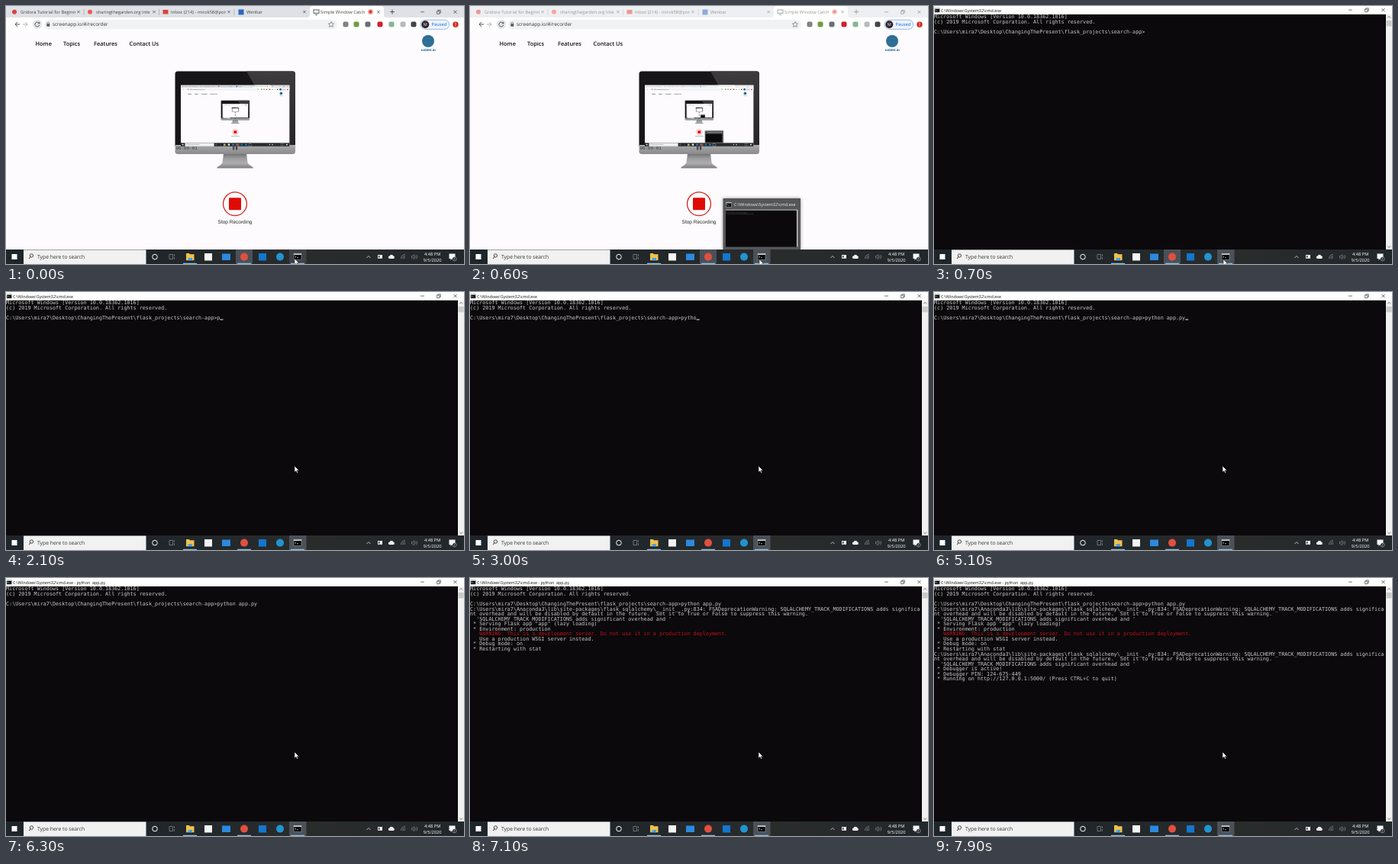
An HTML page that plays this animation: 600 by 338 pixels, repeating every 8 s.

```html
<!DOCTYPE html>
<html lang="en">
<head>
<meta charset="utf-8">
<title>Terminal demo</title>
<style>
html, body { margin: 0; width: 100%; height: 100%; overflow: hidden; background: #fff; }
svg { display: block; }
text { white-space: pre; text-rendering: geometricPrecision; font-family: "Open Sans", sans-serif; }
.mono text { font: 6.75px "DejaVu Sans Mono", monospace; fill: #ccc; }
.mono .warn { fill: #c50f1f; }
.shadow { filter: drop-shadow(0 0 2px rgba(0, 0, 0, .4)); }
</style>
</head>
<body>
<svg id="stage" width="600" height="338" viewBox="0 0 600 338"></svg>
<script>
const LOOP = 8000, COL = 4.064, ROW = 6.56;
const OPEN_AT = 700, ENTER_AT = 5800;

const rect = (x, y, w, h, fill, more = '') =>
  `<rect x="${x}" y="${y}" width="${w}" height="${h}" fill="${fill}" ${more}/>`;
const dot = (x, y, r, fill, more = '') =>
  `<circle cx="${x}" cy="${y}" r="${r}" fill="${fill}" ${more}/>`;
const line = (d, stroke, width = 0.8) =>
  `<path d="${d}" fill="none" stroke="${stroke}" stroke-width="${width}"/>`;
const text = (x, y, str, size, fill = '#222', more = '') =>
  `<text x="${x}" y="${y}" font-size="${size}" fill="${fill}" ${more}>${str}</text>`;
const cross = (x, y, r, stroke) =>
  line(`M${x - r} ${y - r}l${2 * r} ${2 * r}m0 ${-2 * r}l${-2 * r} ${2 * r}`, stroke, 0.7);
const windowButtons = y =>
  line(`M543 ${y}h5M564.5 ${y - 1}h3.5v3.5h-3.500zM565.800 ${y - 1}v-1.300h3.500v3.500h-1.300`, '#222', 0.6) +
  cross(588.5, y, 2, '#222');
const consoleIcon = (x, y, w, h) =>
  rect(x, y, w, h, '#050505', 'stroke="#b8bcc0" stroke-width=".5"') +
  rect(x, y, w, h * 0.2, '#d0d3d6') +
  line(`M${x + w * 0.15} ${y + h * 0.4}l${w * 0.15} ${h * 0.12}l${-w * 0.15} ${h * 0.12}m${w * 0.25} 0h${w * 0.2}`, '#eee', 0.6);

function tab(x, icon, title, width = 72) {
  return icon +
    `<svg x="${x + 17}" y="0" width="${width}" height="15">${text(0, 10, title, 5.8, '#444')}</svg>` +
    cross(x + 93, 7.7, 1.7, '#444');
}

function browserTop() {
  const seps = [102, 200.5, 299].map(x => line(`M${x} 4v8`, '#9a9da1', 0.6)).join('');
  const extras = [[445, '#7d8286'], [459, '#6f9c45'], [474, '#6a6e72'], [490, '#cf222b'],
    [505, '#86b596'], [520, '#b7babd'], [534, '#41454a']]
    .map(([x, c]) => rect(x - 3.5, 20.5, 7, 7, c, 'rx="2"')).join('');
  return rect(0, 0, 600, 15, '#dfe1e6') +
    '<path d="M394 15q4 0 4-4V4q0-4 4-4h89q4 0 4 4v7q0 4 4 4z" fill="#fff"/>' +
    tab(2, dot(11, 7.7, 3, '#d8443c'), 'Gridora Tutorial for Beginners') +
    tab(101, dot(110, 7.7, 3, '#ee5a55'), 'sharingthegarden.org Inte') +
    tab(199, rect(205.5, 5, 7, 5.5, '#d9453b'), 'Inbox (214) - mirok58@pomail') +
    tab(298, rect(304.5, 4.5, 7, 7, '#2d68c4'), 'Wenbar') +
    tab(395, rect(403, 5, 7, 4.5, 'none', 'stroke="#333" stroke-width=".8"') +
      line('M405 11.5h3', '#333'), 'Simple Window Catcher', 58) +
    seps + dot(477.5, 7.7, 3, '#fff', 'stroke="#d93025" stroke-width=".6"') + dot(477.5, 7.7, 2.1, '#d93025') +
    line('M503 7.7h6M506 4.7v6', '#333') + windowButtons(7.8) +
    rect(0, 0, 600, 15, '#fff', 'class="preview" fill-opacity=".45"') +
    rect(0, 15, 600, 18, '#fff') + rect(50, 18, 384, 12.5, '#f0f2f4', 'rx="6.2"') +
    line('M18 24h-6m3-3l-3 3l3 3', '#444', 0.9) +
    line('M22 24h6m-3-3l3 3l-3 3', '#a5a8ab', 0.9) +
    dot(41, 24, 6.3, '#e6e8ea') +
    line('M43.500 22.500a3 3 0 1 0 .3 2.500M43.900 20.700v2.200h-2.200', '#444', 0.9) +
    rect(53.3, 23.3, 4, 3.4, '#555') + line('M54.1 23.5v-1a1.2 1.2 0 0 1 2.4 0v1', '#555', 0.7) +
    text(61, 26.4, 'screenapp.io/#/recorder', 6.4, '#333') +
    '<path d="M426 20.5l1.1 2.4 2.6.3-2 1.7.6 2.6-2.3-1.4-2.3 1.4.6-2.6-2-1.7 2.6-.3z" fill="none" stroke="#555" stroke-width=".6"/>' +
    extras + rect(543, 18.2, 37.7, 12.2, '#edf3fe', 'rx="6.1" stroke="#8db3ee" stroke-width=".9"') +
    dot(549.3, 24.3, 5, '#34252a') + text(549.3, 26.3, 'M', 5.5, '#fff', 'text-anchor="middle"') +
    text(557.5, 26.4, 'Paused', 5.8, '#1a66d0') +
    dot(589, 24.2, 3.7, '#d3281f') + [22.4, 24.2, 26].map(y => dot(589, y, 0.6, '#fff')).join('');
}

function taskbar() {
  const marks = [[232, 18], [303, 18], [373, 18]].map(([x, w]) => rect(x, 336.8, w, 1.2, '#8cbfe6')).join('');
  return rect(0, 319, 600, 19, 'url(#bar)') +
    rect(7.5, 325, 7, 7, '#fff') +
    rect(23, 319.4, 160.5, 18.6, '#f1f1f1') +
    line('M30 331l2.2-2.5', '#222', 0.9) + dot(33.4, 327, 2.2, 'none', 'stroke="#222" stroke-width=".8"') +
    text(41, 331.3, 'Type here to search', 6.8, '#333') +
    dot(195, 328.6, 3.3, 'none', 'stroke="#fff" stroke-width="1"') +
    line('M214 325.5h4.5v6h-4.5zM220.5 325v2.5m0 1.5v3', '#8f9499', 0.7) +
    rect(301, 319, 22, 19, '#4b5159', 'class="chrome"') +
    rect(371, 319, 22.5, 19, '#4b5159', 'class="cmd"') +
    '<path d="M236 324h4l1 1.2h5.5v8H236z" fill="#f0c24b"/>' + rect(238.5, 330, 5.5, 3.2, '#4aa3dc') +
    rect(260, 324, 10, 9.5, '#f3f3f3') + rect(283, 324.5, 11, 8.5, '#2b8ade') +
    dot(312, 328.6, 5, '#e0503f') + rect(331, 324, 10, 9.5, '#1277cf') + dot(359, 328.6, 5, '#2393cf') +
    consoleIcon(377, 324.3, 10, 8.3) + marks +
    line('M472.5 330l2.5-2.5l2.5 2.5', '#ddd') +
    rect(487, 326, 6, 4.8, '#eee') + rect(488, 327, 1.4, 2.6, '#20262d') +
    '<path d="M502.5 331a1.7 1.7 0 0 1 0-3.4 2.7 2.7 0 0 1 5-.2 1.9 1.9 0 0 1 .3 3.6z" fill="#f2f2f2"/>' +
    line('M517.5 331a6 6 0 0 1 5.5-5.5m-3.5 5.6a4 4 0 0 1 3.6-3.6m-1.6 3.6a2 2 0 0 1 1.7-1.7', '#969ba1', 0.7) +
    line('M531.5 327.5h1.4l2-1.8v6l-2-1.8h-1.4zM536.5 327.3q1 1.4 0 2.8m1.3-4q2 2.6 0 5.2', '#969ba1', 0.6) +
    text(558.7, 326.6, '4:48 PM', 5.7, '#fff', 'text-anchor="middle"') +
    text(558.7, 335, '9/5/2020', 5.7, '#fff', 'text-anchor="middle"') +
    '<path d="M580.5 324.5h8v6.5h-4l-2 2v-2h-2z" fill="#f4f4f4"/>' +
    dot(587.5, 331.3, 2.6, '#20262d', 'stroke="#ddd" stroke-width=".5"') +
    text(587.5, 333, '1', 4.5, '#fff', 'text-anchor="middle"');
}

function preview() {
  return '<g class="preview">' + rect(331.5, 252, 101.5, 67, '#555657', 'class="shadow"') +
    consoleIcon(335.5, 257.2, 7, 6) + text(346, 262, 'C:\\Windows\\System32\\cmd.exe', 5.5, '#f2f2f2') +
    rect(335, 267, 94, 48.5, '#0b090b') + rect(335, 266.5, 94, 1.4, '#9a9a9a') + rect(428, 267, 1.2, 48.5, '#ddd') +
    text(335.5, 270.6, '(c) 2019 Microsoft Corporation.', 2, '#777') +
    text(335.5, 273.4, 'C:\\Users\\mira7\\Desktop\\flask_projects', 2, '#777') + '</g>';
}

// The monitor shows the desktop again, so this nests until depth runs out.
function desktop(depth) {
  const nav = [[38.5, 'Home'], [75, 'Topics'], [115, 'Features'], [161.5, 'Contact Us']]
    .map(([x, s]) => text(x, 52.3, s, 7.4, '#111', 'font-weight="600"')).join('');
  const inner = depth
    ? `<svg x="229" y="103.5" width="142.6" height="80.4" viewBox="0 0 600 338">${desktop(depth - 1)}</svg>`
    : rect(229, 103.5, 142.6, 80.4, '#f7f6f7');
  return rect(0, 0, 600, 338, '#fdfbfd') + browserTop() + nav +
    dot(553, 46, 8, '#2e6f96') +
    text(553.3, 58.8, 'noblet.in', 4.3, '#1d5f9e', 'text-anchor="middle" font-weight="700"') +
    '<path d="M285 193h30l1.500 12q1 3 7 6v1.500H276.500V211q6-3 7-6z" fill="url(#stand)"/>' +
    '<path d="M221.500 89q0-3.500 3.500-3.500h150.500q3.500 0 3.500 3.500v95H221.500z" fill="#171518"/>' +
    '<path d="M315 85.500h60.500q3.500 0 3.500 3.500v95h-7z" fill="url(#glare)"/>' +
    '<path d="M221.500 182h157.500v8.500q0 3.500-3.500 3.500H225q-3.500 0-3.500-3.500z" fill="url(#chin)"/>' + inner +
    text(222.5, 187.8, '00:00:01', 5.9, '#333', 'style="font-family:\'Liberation Mono\',monospace"') +
    rect(297, 182.5, 2.2, 6, '#444') + rect(301, 182.5, 2.2, 6, '#444') +
    dot(300, 259.2, 15.4, '#fff', 'stroke="#d8201a" stroke-width="1.3"') +
    rect(292, 251.2, 16, 16, '#e00a05', 'rx="1"') +
    text(300, 284.7, 'Stop Recording', 6.5, '#222', 'text-anchor="middle" style="font-family:\'Liberation Sans\',sans-serif"') +
    preview() + taskbar();
}

const USER = 'C:\\Users\\mira7\\';
const PROMPT = USER + 'Desktop\\ChangingThePresent\\flask_projects\\search-app>';
const COMMAND = 'python app.py';
const KEYS = [2050, 2400, 2600, 2800, 3000, 3200, 3500, 3700, 3850, 4100, 4400, 4600, 4900];
const NOTICE = [
  USER + 'Anaconda3\\lib\\site-packages\\flask_sqlalchemy\\__init__.py:834: FSADeprecationWarning: SQLALCHEMY_TRACK_MODIFICATIONS adds significa',
  'nt overhead and will be disabled by default in the future.  Set it to True or False to suppress this warning.',
  "  'SQLALCHEMY_TRACK_MODIFICATIONS adds significant overhead and '"
];
const OUTPUT = [
  [6700, ...NOTICE, ' * Serving Flask app "app" (lazy loading)', ' * Environment: production',
    '   WARNING: This is a development server. Do not use it in a production deployment.',
    '   Use a production WSGI server instead.', ' * Debug mode: on', ' * Restarting with stat'],
  [7600, ...NOTICE, ' * Debugger is active!', ' * Debugger PIN: 124-675-449',
    ' * Running on http://127.0.0.1:5000/ (Press CTRL+C to quit)']
];

const row = (i, str, more = '') => `<text x="0" y="${16.3 + ROW * i}" ${more}>${str}</text>`;

function terminal() {
  let n = 4;
  const blocks = OUTPUT.map(([, ...lines]) => '<g class="block">' +
    lines.map(s => row(n++, s, s.includes('WARNING:') ? 'class="warn"' : '')).join('') + '</g>').join('');
  return '<g id="terminal">' + rect(0, 11, 600, 308, '#0b090b') + '<g class="mono">' +
    row(0, 'Microsoft Windows [Version 10.0.18362.1016]') +
    row(1, '(c) 2019 Microsoft Corporation. All rights reserved.') +
    row(3, PROMPT, 'id="input"') + blocks + '</g>' +
    rect(0, 35.6, COL, 1.1, '#ddd', 'id="caret"') +
    rect(0, 0, 600, 11, '#fff') + consoleIcon(1, 2.8, 6.4, 5.4) +
    text(9, 7.5, '', 5.4, '#111', 'id="title"') + windowButtons(5.2) +
    rect(592, 11, 8, 308, '#f1f1f1') + rect(592.6, 19, 7, 7.5, '#cbcbcb') +
    line('M594.3 15.5l1.9-2l1.9 2M594.3 314.5l1.9 2l1.9-2', '#555', 0.8) +
    taskbar() + '</g>';
}

const gradient = (id, dir, ...colors) => `<linearGradient id="${id}" ${dir}>` +
  colors.map((c, i) => `<stop offset="${i / (colors.length - 1)}" stop-color="${c}"/>`).join('') + '</linearGradient>';
const DOWN = 'x2="0" y2="1"';

const stage = document.getElementById('stage');
stage.innerHTML = '<defs>' +
  gradient('chin', DOWN, '#a9a9aa', '#8b8b8d') +
  gradient('stand', DOWN, '#6c6c6e', '#9c9c9e', '#aeaeb0', '#7c7c7f') +
  gradient('glare', DOWN, '#3d3b3e', '#262427') +
  gradient('bar', '', '#1e252b', '#20262b', '#2a2c2c', '#22272b') +
  '</defs>' + desktop(2) + terminal() +
  '<path id="mouse" d="M0 0v8l1.9-1.7 1.3 2.8 1.3-.6-1.3-2.7h2.6z" fill="#fff" stroke="#111" stroke-width=".5"/>';

const get = id => document.getElementById(id);
const all = cls => [...stage.getElementsByClassName(cls)];
const [term, input, caret, title, mouse] = ['terminal', 'input', 'caret', 'title', 'mouse'].map(get);
const previews = all('preview'), chrome = all('chrome'), cmd = all('cmd'), blocks = all('block');
const show = (el, on) => el.setAttribute('opacity', +on);
const ramp = (t, a, b) => Math.min(1, Math.max(0, (t - a) / (b - a)));
const ease = u => u * u * (3 - 2 * u);

function draw(t) {
  show(term, t >= OPEN_AT);
  previews.forEach(el => show(el, ramp(t, 350, 500)));
  chrome.forEach(el => show(el, 1 - ramp(t, 750, 900)));
  cmd.forEach(el => show(el, t < 200 ? 0.6 : 1));

  const typed = KEYS.filter(k => k <= t).length;
  input.textContent = PROMPT + COMMAND.slice(0, typed);
  caret.setAttribute('x', (PROMPT.length + typed) * COL);
  show(caret, t < ENTER_AT && Math.floor((t + 330) / 530) % 2 === 0);

  title.textContent = 'C:\\Windows\\System32\\cmd.exe' + (t >= ENTER_AT ? ' - python  app.py' : '');
  blocks.forEach((el, i) => show(el, t >= OUTPUT[i][0]));

  const nudge = ramp(t, 50, 200), lift = ease(ramp(t, 1000, 1500));
  mouse.setAttribute('transform', `translate(${378 + nudge - lift} ${331 + nudge - 104 * lift})`);
}

const start = performance.now();
function tick() {
  draw((performance.now() - start) % LOOP);
  requestAnimationFrame(tick);
}
tick();
</script>
</body>
</html>
```
